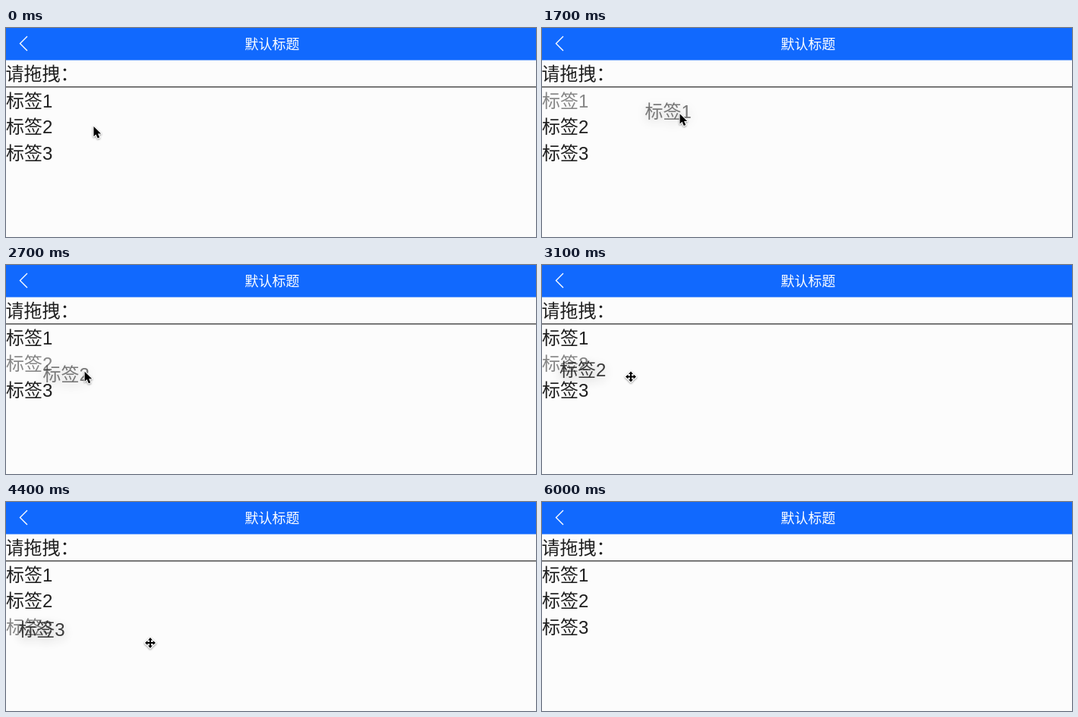
Recreate the animation shown at these times as an HTML page. Size 698 by 276 pixels, loop 6100 ms.

```html
<!DOCTYPE html>
<html lang="zh-CN">
<head>
<meta charset="utf-8">
<title>默认标题</title>
<style>
  html, body { margin: 0; width: 100%; height: 100%; overflow: hidden; background: #fcfcfc; }
  svg { display: block; width: 698px; height: 276px; }
  text { font: 24px "Liberation Sans", "Noto Sans CJK SC", "Noto Sans CJK", sans-serif; fill: #1f1f1f; }
  .title { font-size: 18px; fill: #fff; }
  #ghost { filter: drop-shadow(0 4px 7px rgba(0, 0, 0, .3)); }
  #cursor { filter: drop-shadow(0 1px 1px rgba(0, 0, 0, .4)); }
  #arrow, #cross { stroke: #fff; stroke-linejoin: round; paint-order: stroke; }
</style>
</head>
<body>
<svg viewBox="0 0 698 276">
  <rect width="698" height="42.5" fill="#1169fe"/>
  <path d="M28 11L18.5 20.5L28 30" fill="none" stroke="#fff" stroke-width="1.4"/>
  <text class="title" x="314.5" y="27.6">默认标题</text>
  <text x="-.5" y="69.2">请拖拽：</text>
  <rect y="77.2" width="698" height="1.3" fill="#333"/>
  <g id="labels"></g>
  <text id="ghost"></text>
  <g id="cursor">
    <path id="arrow" stroke-width="2" d="M0 0V13.2L3 10.4L5.2 15.6L7.7 14.6L5.5 9.5H9.6Z"/>
    <path id="cross" stroke-width="2.4" d="M0 -7L3 -3.6H1V-1H3.6V-3L7 0L3.6 3V1H1V3.6H3L0 7L-3 3.6H-1V1H-3.6V3L-7 0L-3.6 -3V-1H-1V-3.6H-3Z"/>
  </g>
</svg>
<script>
const LOOP = 6100, STEP = 100;
const HOVER = 900, HOVER_END = 1300, DIP = 33;
const FADE = 400, RESTORE = 600;

// Cursor moves; every second one drags a label
const home = { x: 115.5, y: 130 };
const legs = [
  { from: 100, to: 500, x: 46, y: 99 },
  { from: 1300, to: 1800, x: 201, y: 117 },
  { from: 1900, to: 2300, x: 55, y: 127 },
  { from: 2500, to: 2800, x: 117, y: 147.5 },
  { from: 3200, to: 3500, x: 43, y: 154 },
  { from: 3700, to: 4000, x: 190, y: 186 },
  { from: 4400, to: 4800, x: 500, y: 147 }
];
const exit = legs[legs.length - 1];

const $ = id => document.getElementById(id);
const ghost = $("ghost"), cursor = $("cursor");
const show = (el, on) => el.setAttribute("visibility", on ? "visible" : "hidden");
const place = (el, x, y) => el.setAttribute("transform", `translate(${x} ${y})`);

const drags = [1, 3, 5].map((leg, i) => {
  const label = ghost.cloneNode();
  label.removeAttribute("id");
  label.textContent = "标签" + (i + 1);
  label.setAttribute("y", 104.5 + 34.5 * i);
  $("labels").append(label);
  const { from, to } = legs[leg];
  return { label, grab: legs[leg - 1], start: from + STEP, drop: to + STEP };
});

function cursorAt(t) {
  let { x, y } = home;
  for (const leg of legs) {
    const p = Math.min(1, Math.max(0, (t - leg.from) / (leg.to - leg.from)));
    x += (leg.x - x) * p ** .6; // sideways motion leads
    y += (leg.y - y) * p;
  }
  if (t > HOVER && t < HOVER_END)
    y += DIP * Math.sin(Math.PI * (t - HOVER) / (HOVER_END - HOVER));
  return { x, y };
}

function drawGhost(t, { label, grab, drop }) {
  const since = t - drop;
  const left = since < 0 ? 1 : Math.max(.11, 1 - .315 * since / STEP);
  const { x, y } = cursorAt(Math.min(t, drop));
  ghost.textContent = label.textContent;
  ghost.setAttribute("y", label.getAttribute("y"));
  place(ghost, (x - grab.x) * left, (y - grab.y) * left);
  ghost.style.opacity = since <= 0 ? .6 : since < FADE ? .87 : .1;
}

function draw(time) {
  const t = Math.floor(time % LOOP / STEP) * STEP;
  for (const d of drags)
    d.label.style.opacity = t >= d.start && t < d.drop + RESTORE ? .53 : 1;

  const active = drags.find(d => t >= d.start && t <= d.drop + FADE);
  show(ghost, active);
  if (active) drawGhost(t, active);

  const on = t < exit.to;
  const arrow = t < legs[0].to - STEP || t > exit.from || active && t <= active.drop;
  const { x, y } = cursorAt(t);
  place(cursor, x, y);
  show($("arrow"), on && arrow);
  show($("cross"), on && !arrow);
}

const begin = performance.now();
function tick() {
  draw(performance.now() - begin);
  requestAnimationFrame(tick);
}
tick();
</script>
</body>
</html>
```
